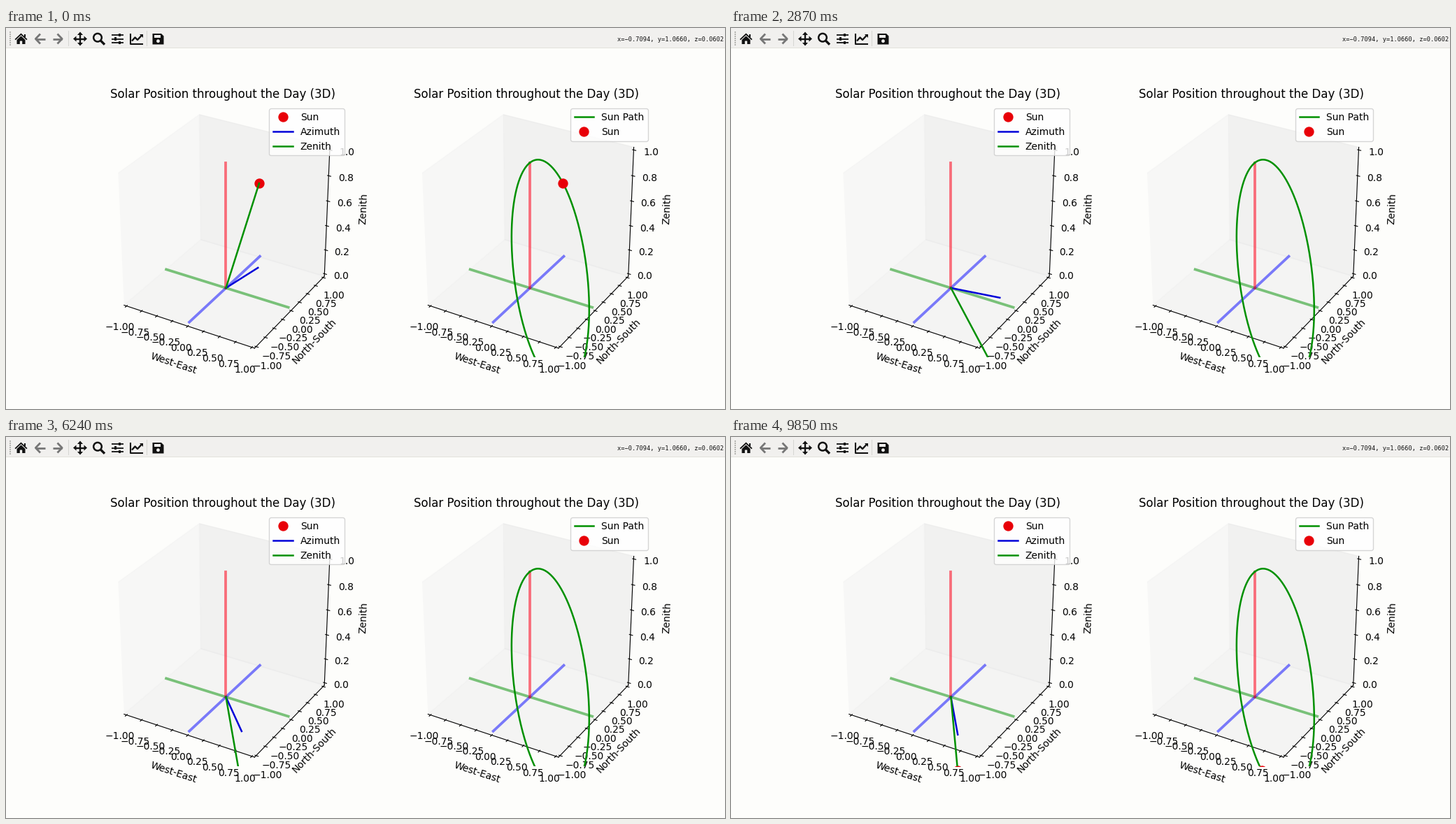
Recreate the animation shown at these times as a matplotlib script. Size 1028 by 545 pixels, loop 9890 ms.

```python
import numpy as np
import matplotlib.pyplot as plt
from matplotlib.animation import FuncAnimation
from matplotlib.patches import Circle, Polygon, Rectangle
from mpl_toolkits.mplot3d import proj3d

W, H, DPI = 1028, 545, 100
LOOP, FRAMES = 9890, 230
SIDE = 362.1
LEFT, TOP = 128.5, 108.5
STEP = 434.57
PAPER, BAR, INK = "#fdfdfb", "#f1f0ee", "#111111"
RED, GREEN, BLUE = "#e80008", "#009000", "#0000d8"
TILT = np.radians(23.2)

# hour angle (degrees) reached at each moment (ms)
TIMES = [0, 1710, 2870, 4610, 6240, 8240, 9890]
ANGLES = [-50.2, 71.2, 191, 362.3, 495.8, 689.2, 846.4]

plt.rcParams["font.family"] = "DejaVu Sans"
fig = plt.figure(figsize=(W / DPI, H / DPI), dpi=DPI, facecolor=PAPER)


def sun_at(angle):
    """Sun on the unit sphere for an hour angle in radians."""
    c, s = np.cos(TILT), np.sin(TILT)
    x = c * s * (1 - np.cos(angle))
    y = -c * np.sin(angle)
    z = s * s + c * c * np.cos(angle)
    return x, y, z


def full_axes():
    ax = fig.add_axes([0, 0, 1, 1])
    ax.set(xlim=(0, W), ylim=(H, 0))
    ax.axis("off")
    return ax


def sun_style():
    return dict(color=RED, marker="o", markersize=9.3, linestyle="none")


def solar_axes(left):
    box = [left / W, 1 - (TOP + SIDE) / H, SIDE / W, SIDE / H]
    ax = fig.add_axes(box, projection="3d", facecolor="none")
    ax.set_box_aspect((1, 1, 1))
    ax.view_init(30, -60)
    ticks = np.linspace(-1, 1, 9)
    ax.set_xticks(ticks)
    ax.set_yticks(ticks)
    ax.set_zticks(np.linspace(0, 1, 6))
    ax.set(xlim=(-25 / 24, 25 / 24), ylim=(-25 / 24, 25 / 24),
           zlim=(-1 / 48, 49 / 48))
    ax.set(xlabel="West-East", ylabel="North-South", zlabel="Zenith")
    ax.set_title("Solar Position throughout the Day (3D)")
    ax.grid(False)
    zero = [0, 0]
    ax.plot([-1, 1], zero, zero, color="#008f00", alpha=0.5, lw=2.7)
    ax.plot(zero, [-1, 1], zero, color="#0000ff", alpha=0.5, lw=2.7)
    ax.plot(zero, zero, [0, 1], color="#ff0018", alpha=0.55, lw=2.7)
    return ax


def legend(ax, *items):
    for label, style in items:
        ax.plot([], [], [], label=label, **style)
    ax.legend(loc="upper right")


def stroke(ax, points, color=INK, lw=1.7, **kw):
    x, y = zip(*points)
    ax.plot(x, y, color=color, lw=lw, solid_capstyle="butt", **kw)


def fill(ax, points, color=INK):
    ax.add_patch(Polygon(points, closed=True, fc=color, lw=0))


def block(ax, x, y, w, h, color=INK):
    ax.add_patch(Rectangle((x, y), w, h, fc=color, lw=0))


def toolbar(ax):
    block(ax, 0, 0, W, 28.5, BAR)
    block(ax, 0, 28, W, 1, "#e2e2dc")
    for y in range(5, 26, 3):
        block(ax, 5, y, 1.5, 1.5, "#b4b4b0")
    for x in (89, 201):
        block(ax, x, 4, 1, 22, "#d6d6d2")

    # home
    fill(ax, [(12.5, 16), (21.5, 7.5), (30.5, 16), (29.3, 17.3),
              (21.5, 10), (13.7, 17.3)])
    fill(ax, [(15.5, 17), (21.5, 11.4), (27.5, 17), (27.5, 23), (23.2, 23),
              (23.2, 18.5), (19.8, 18.5), (19.8, 23), (15.5, 23)])
    block(ax, 25.5, 8.5, 2.2, 4.5)

    # back and forward
    for tip, d in ((41, 1), (81.5, -1)):
        stroke(ax, [(tip + 1.5 * d, 15.5), (tip + 15 * d, 15.5)], "#767676", 2)
        stroke(ax, [(tip + 8 * d, 8.5), (tip + 1.3 * d, 15.5),
                    (tip + 8 * d, 22.5)], "#767676", 2)

    # pan
    cx, cy = 106, 15.5
    stroke(ax, [(cx - 7, cy), (cx + 7, cy)])
    stroke(ax, [(cx, cy - 7), (cx, cy + 7)])
    for dx, dy in ((1, 0), (-1, 0), (0, 1), (0, -1)):
        bx, by = cx + 5.5 * dx, cy + 5.5 * dy
        fill(ax, [(cx + 10 * dx, cy + 10 * dy), (bx - 4 * dy, by + 4 * dx),
                  (bx + 4 * dy, by - 4 * dx)])

    # zoom
    ax.add_patch(Circle((131, 13.7), 5.8, fill=False, ec=INK, lw=1.8))
    stroke(ax, [(135, 17.7), (141, 23.7)], lw=2.4)

    # sliders
    for y, knob in ((10, 161), (15.5, 155), (21, 161)):
        stroke(ax, [(151, y), (168, y)], lw=1.3)
        block(ax, knob, y - 2.3, 3, 4.6)

    # chart
    stroke(ax, [(177.5, 8), (177.5, 22.5), (196, 22.5)], lw=1.5)
    stroke(ax, [(180, 18.5), (184.5, 13.5), (188, 17), (194, 10.5)], lw=1.7)
    fill(ax, [(190.5, 9), (195.5, 9), (195.5, 14)])

    # save
    fill(ax, [(209.5, 8), (222, 8), (225.5, 11.5), (225.5, 23.5), (209.5, 23.5)])
    block(ax, 211.5, 9.8, 9.5, 4, BAR)
    ax.add_patch(Circle((217.5, 18.7), 2.4, fc=BAR, lw=0))

    ax.text(1026, 18.8, "x=\u22120.7094, y=1.0660, z=0.0602", color=INK,
            family="DejaVu Sans Mono", size=6.2, ha="right", va="baseline")


# the still parts are rendered once and reused as a backdrop
toolbar(full_axes())
view = solar_axes(LEFT)
legend(view, ("Sun", sun_style()), ("Azimuth", dict(color=BLUE, lw=1.8)),
       ("Zenith", dict(color=GREEN, lw=1.8)))
orbit = solar_axes(LEFT + STEP)
orbit.plot(*sun_at(np.linspace(0, 2 * np.pi, 361)), color=GREEN, lw=1.8)
legend(orbit, ("Sun Path", dict(color=GREEN, lw=1.8)), ("Sun", sun_style()))
fig.canvas.draw()
backdrop = np.array(fig.canvas.buffer_rgba())
matrix = view.get_proj()
to_figure = view.transData.frozen()


def screen(x, y, z):
    px, py, _ = proj3d.proj_transform(x, y, z, matrix)
    sx, sy = to_figure.transform((float(px), float(py)))
    return sx, H - sy


fig.clear()
stage = full_axes()
stage.imshow(backdrop, extent=(0, W, H, 0), aspect="auto",
             interpolation="nearest")
stage.set(xlim=(0, W), ylim=(H, 0))


def moving(left, **style):
    line, = stage.plot([], [], **style)
    line.set_clip_path(Rectangle((left, TOP), SIDE, SIDE,
                                 transform=stage.transData))
    return line


sun = moving(LEFT, **sun_style())
azimuth = moving(LEFT, color=BLUE, lw=1.8)
zenith = moving(LEFT, color=GREEN, lw=1.8)
twin = moving(LEFT + STEP, **sun_style())
center = screen(0, 0, 0)


def ray(line, end):
    line.set_data([center[0], end[0]], [center[1], end[1]])


def update(i):
    angle = np.radians(np.interp(i * LOOP / FRAMES, TIMES, ANGLES))
    x, y, z = sun_at(angle)
    sx, sy = screen(x, y, z)
    sun.set_data([sx], [sy])
    twin.set_data([sx + STEP], [sy])
    ray(azimuth, screen(x, y, 0))
    ray(zenith, (sx, sy))
    return sun, azimuth, zenith, twin


anim = FuncAnimation(fig, update, frames=FRAMES, interval=LOOP / FRAMES,
                     repeat=True, repeat_delay=0, blit=False)
plt.show()
```
